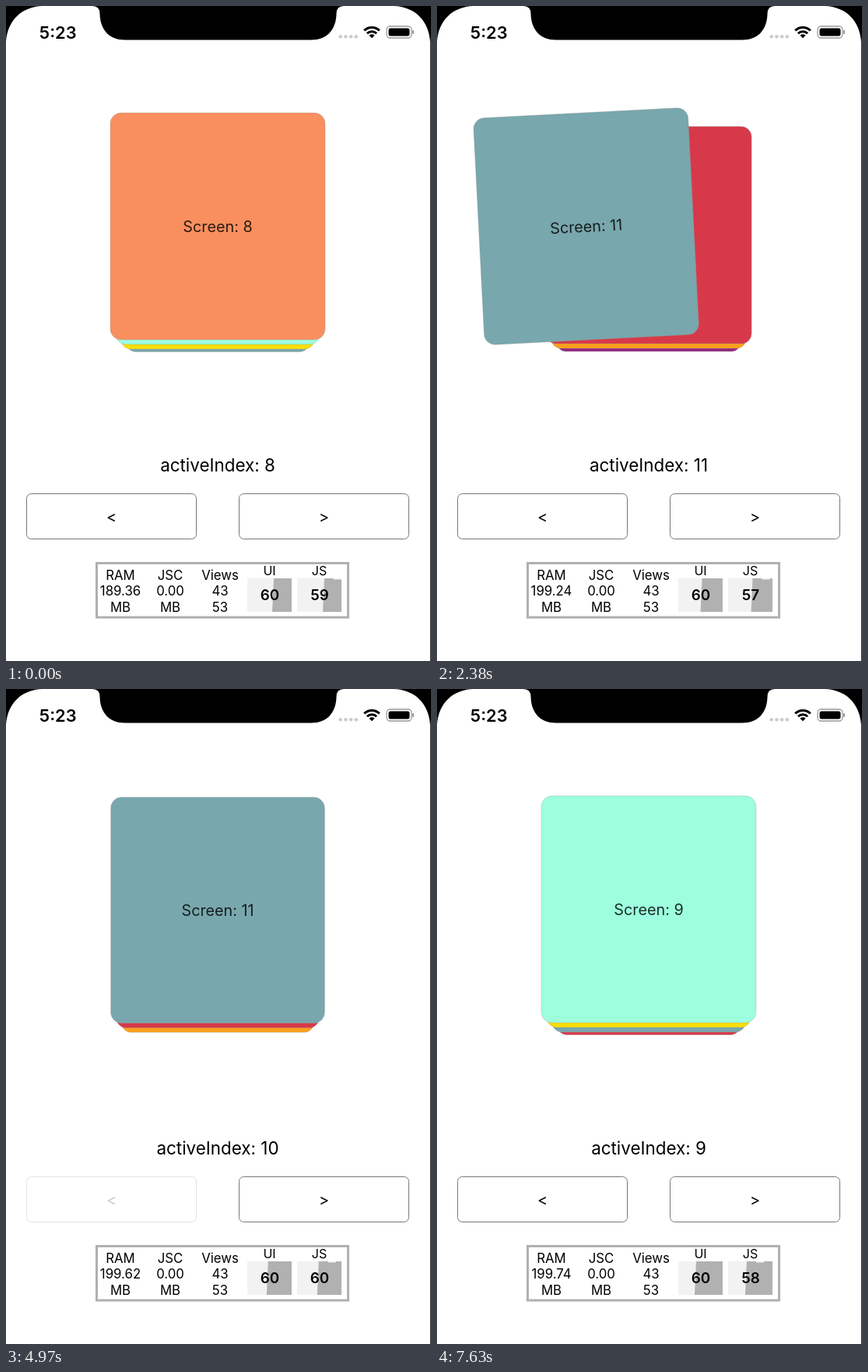
Animation of 546 by 840 pixels, one loop 7.7 s. Source, as an HTML page with a canvas:

```html
<!DOCTYPE html>
<html lang="en">
<head>
<meta charset="utf-8">
<title>Card stack</title>
<style>
  html, body { margin: 0; width: 100%; height: 100%; overflow: hidden; background: #fff; }
  canvas { display: block; }
</style>
</head>
<body>
<canvas id="stage" width="546" height="840"></canvas>
<script>
const ctx = document.getElementById('stage').getContext('2d');
const LOOP = 7700, STEP = 70, WIDTH = 546, FIRST = 8;
const CARD = { x: 272, y: 282.5, w: 276, h: 291, r: 14 };
const COLORS = ['#f98f5f', '#9dffde', '#fbde05', '#78a7ad', '#d7394a', '#fc9f1b', '#92297f', '#ef8b82'];

// Button releases: time and direction
const PRESSES = [
  [205, 1], [1004, 1], [1970, 1], [2940, 1],
  [3930, -1], [4925, -1], [5350, -1], [5890, 1], [6545, -1]
];
// Monitor readings: start time and value
const RAM = [[0, '189.36'], [630, '193.27'], [1680, '199.24'], [2940, '199.47'],
  [4200, '199.62'], [5600, '198.32'], [6930, '199.74']];
const JS_FPS = [[0, '59'], [1680, '57'], [2940, '59'], [4200, '60'], [5600, '58']];

const reading = (list, t) => list.filter(([start]) => start <= t).pop()[1];
const clamp = v => Math.min(1, Math.max(0, v));
const easeInOut = v => v < 0.5 ? 2 * v * v : 1 - 2 * (1 - v) ** 2;

// Unit step of a spring with stiffness 100, damping 10, mass 1
function spring(ms) {
  if (ms <= 0) return 0;
  const s = ms / 1000, w = Math.sqrt(75);
  return 1 - Math.exp(-5 * s) * (Math.cos(w * s) + 5 / w * Math.sin(w * s));
}

function buttonOpacity(t, direction) {
  return PRESSES.reduce((opacity, [time, dir]) => {
    const dt = t - time;
    if (dir !== direction || dt < -100 || dt > 310) return opacity;
    return dt < 0 ? 1 - 0.8 * (dt + 100) / 100 : 0.2 + 0.8 * easeInOut(clamp((dt - 60) / 250));
  }, 1);
}

function text(str, x, y, size, weight = 400, color = '#000') {
  ctx.font = `${weight} ${size}px Inter, sans-serif`;
  ctx.textAlign = 'center';
  ctx.fillStyle = color;
  ctx.fillText(str, x, y);
}

function rect(x, y, w, h, color) {
  ctx.fillStyle = color;
  ctx.fillRect(x, y, w, h);
}

function roundRect(x, y, w, h, r, fill, stroke, lineWidth = 1) {
  ctx.beginPath();
  ctx.roundRect(x, y, w, h, r);
  if (fill) { ctx.fillStyle = fill; ctx.fill(); }
  if (stroke) { ctx.strokeStyle = stroke; ctx.lineWidth = lineWidth; ctx.stroke(); }
}

function drawCard(index, position) {
  const depth = Math.max(0, index - position);
  const gone = Math.max(0, position - index);
  if (gone > 1.1) return;
  const scale = 1 - 0.05 * depth;
  const bottom = 428 + 6 * Math.min(depth, 2) + 3.5 * Math.max(0, depth - 2);
  ctx.save();
  ctx.translate(CARD.x - WIDTH * gone, bottom - CARD.h / 2 * scale);
  ctx.rotate(-20 * gone * Math.PI / 180);
  ctx.scale(scale, scale);
  roundRect(-CARD.w / 2, -CARD.h / 2, CARD.w, CARD.h, CARD.r, COLORS[index - FIRST], 'rgba(150,150,150,.35)');
  text('Screen: ' + index, 0, 7.3, 19.8, 400, 'rgba(0,0,0,.82)');
  ctx.restore();
}

function drawButton(label, x, opacity) {
  ctx.globalAlpha = opacity;
  roundRect(x, 625.5, 218, 58, 6, null, '#777');
  text(label, x + 109, 662, 19.8);
  ctx.globalAlpha = 1;
}

function drawGraph(label, fps, x, edge) {
  text(label, x + 28.5, 730, 16);
  rect(x, 734, 57, 43, '#f2f2f2');
  ctx.fillStyle = '#b1b1b1';
  ctx.beginPath();
  ctx.moveTo(edge + 1, 734);
  ctx.lineTo(x + 57, 734);
  ctx.lineTo(x + 57, 777);
  ctx.lineTo(edge - 1, 777);
  ctx.fill();
  text(fps, x + 29, 762, 18.8, 600);
}

function drawMonitor(t) {
  ctx.strokeStyle = '#b0b0b0';
  ctx.lineWidth = 3;
  ctx.strokeRect(116.5, 714.5, 323, 69.5);
  const columns = [
    [147, ['RAM', reading(RAM, t), 'MB']],
    [211, ['JSC', '0.00', 'MB']],
    [275, ['Views', '43', '53']]
  ];
  for (const [x, lines] of columns)
    lines.forEach((line, i) => text(line, x, 735.5 + 20.6 * i, 16.8));
  const scroll = t * 0.00145;
  drawGraph('UI', '60', 310, 343 - scroll);
  drawGraph('JS', reading(JS_FPS, t), 374, 408 - scroll);
  rect(421 - scroll, 734, 10, 1.5, '#f2f2f2');
}

function drawStatusBar() {
  ctx.fillStyle = '#000';
  // Screen corners
  ctx.beginPath();
  ctx.moveTo(0, 0); ctx.lineTo(47, 0);
  ctx.bezierCurveTo(20, 1, 2, 18, 0, 46);
  ctx.moveTo(WIDTH, 0); ctx.lineTo(498, 0);
  ctx.bezierCurveTo(525, 1, 543, 18, 545, 46); ctx.lineTo(WIDTH, 46);
  ctx.fill();
  // Notch
  ctx.beginPath();
  ctx.moveTo(111, 0);
  ctx.quadraticCurveTo(120.5, 0, 120.5, 10);
  ctx.bezierCurveTo(121, 31, 133, 43.5, 153, 43.5);
  ctx.lineTo(392, 43.5);
  ctx.bezierCurveTo(412, 43.5, 424, 31, 424.5, 10);
  ctx.quadraticCurveTo(424.5, 0, 434, 0);
  ctx.fill();
  rect(545, 40, 1, 800, '#222');

  text('5:23', 66.7, 41.5, 21.8, 600);
  ctx.fillStyle = '#ccc';
  for (let i = 0; i < 4; i++) {
    ctx.beginPath();
    ctx.arc(429.7 + 6.7 * i, 39.3, 2.3, 0, 7);
    ctx.fill();
  }
  // Wi-Fi
  ctx.strokeStyle = '#000';
  for (const [radius, lineWidth] of [[13.8, 3], [8.6, 3], [2.5, 5]]) {
    ctx.lineWidth = lineWidth;
    ctx.beginPath();
    ctx.arc(470, 41.3, radius, -Math.PI * 0.75, -Math.PI * 0.25);
    ctx.stroke();
  }
  // Battery
  roundRect(489, 26, 32, 15, 4.5, null, '#999', 1.3);
  roundRect(491.5, 28.4, 27, 10.2, 2.5, '#000');
  roundRect(522, 31, 2, 5, 1, '#999');
}

function draw(t) {
  let active = FIRST, position = FIRST;
  for (const [time, direction] of PRESSES) {
    if (t >= time) active += direction;
    position += direction * spring(t - time);
  }
  rect(0, 0, WIDTH, 840, '#fff');
  for (let i = Math.min(active + 3, FIRST + COLORS.length - 1); i >= FIRST; i--) drawCard(i, position);
  text('activeIndex: ' + active, 272, 596.5, 22.4);
  drawButton('<', 26.5, buttonOpacity(t, -1));
  drawButton('>', 299.5, buttonOpacity(t, 1));
  drawMonitor(t);
  drawStatusBar();
}

const start = performance.now();
function tick() {
  const t = (performance.now() - start) % LOOP;
  draw(Math.floor(t / STEP) * STEP);
  requestAnimationFrame(tick);
}
tick();
</script>
</body>
</html>
```
